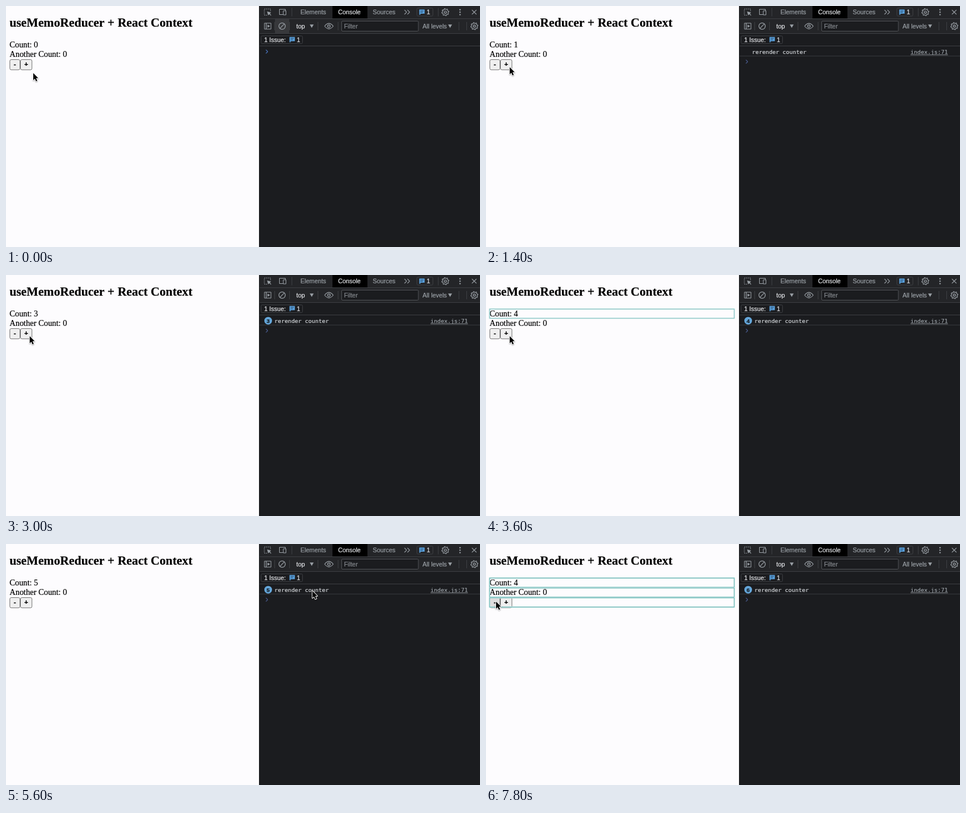
An HTML page with a canvas that plays this animation: 800 px wide and 407 px high, repeating every 8000 ms.

```html
<!DOCTYPE html>
<html lang="en">
<head>
<meta charset="utf-8">
<title>Reducer demo with console</title>
<style>
  html, body { margin: 0; width: 100%; height: 100%; overflow: hidden; background: #fdfcfe; }
  canvas { display: block; width: 100vw; height: 100vh; }
</style>
</head>
<body>
<canvas id="stage"></canvas>
<script>
const W = 800, H = 407, LOOP = 8000, STEP = 200;
const canvas = document.getElementById('stage');
const ctx = canvas.getContext('2d');
const ratio = window.devicePixelRatio || 1;
canvas.width = W * ratio;
canvas.height = H * ratio;

const SANS = '"Liberation Sans", sans-serif';
const SERIF = '"Liberation Serif", serif';
const UI = '10.4px ' + SANS;
const BODY = '13.84px ' + SERIF;
const MONO = '9.52px "DejaVu Sans Mono", monospace';
const PAGE = '#fdfcfe', PANEL = '#1b1c1f', BAR = '#242528', LINE = '#3c3e42';
const ICON = '#9aa0a6', BRIGHT = '#e8eaed', BLUE = '#5ba3e0';

// The plus button is clicked at an even pace, then minus once
const plusClicks = Array.from({ length: 5 }, (_, i) => 1000 + 750 * i);
const MINUS_CLICK = 7800;

const home = { x: 46, y: 112 };
const moves = [
  { from: 200, to: 1000, x: 40, y: 102 },
  { from: 3800, to: 4200, x: 50, y: 107 },
  { from: 4400, to: 4800, x: 41, y: 103 },
  { from: 4800, to: 5800, x: 537, y: 77 },
  { from: 6000, to: 6400, x: 752, y: 77 },
  { from: 6800, to: 7600, x: 17, y: 96 }
];

const easeOut = k => 1 - (1 - k) ** 2;

function pointerAt(t) {
  let { x, y } = home;
  for (const m of moves) {
    if (t <= m.from) break;
    const k = easeOut(Math.min(1, (t - m.from) / (m.to - m.from)));
    x += (m.x - x) * k;
    y += (m.y - y) * k;
  }
  return { x, y };
}

// A hairline stroke gives the heavier look of smoothed text
function text(str, x, y, font, color, align = 'left') {
  ctx.font = font;
  ctx.fillStyle = ctx.strokeStyle = color;
  ctx.lineWidth = 0.2;
  ctx.textAlign = align;
  ctx.fillText(str, x, y);
  ctx.strokeText(str, x, y);
}

function rect(x, y, w, h, color) {
  ctx.fillStyle = color;
  ctx.fillRect(x, y, w, h);
}

function paint(fill, stroke, width = 1.1) {
  if (fill) { ctx.fillStyle = fill; ctx.fill(); }
  if (stroke) { ctx.strokeStyle = stroke; ctx.lineWidth = width; ctx.stroke(); }
}

function box(x, y, w, h, r, fill, stroke, width = 1) {
  ctx.beginPath();
  ctx.roundRect(x, y, w, h, r);
  paint(fill, stroke, width);
}

function circle(x, y, r, fill, stroke) {
  ctx.beginPath();
  ctx.arc(x, y, r, 0, Math.PI * 2);
  paint(fill, stroke, 1.2);
}

function line(x1, y1, x2, y2, color = ICON, width = 1.2) {
  ctx.beginPath();
  ctx.moveTo(x1, y1);
  ctx.lineTo(x2, y2);
  paint(null, color, width);
}

function triangle(x, y, r, angle) {
  ctx.beginPath();
  for (let i = 0; i < 3; i++) {
    const a = angle + i * Math.PI * 2 / 3;
    ctx.lineTo(x + r * Math.cos(a), y + r * Math.sin(a));
  }
  ctx.closePath();
  paint(ICON);
}

function chevron(x, y, r, color = ICON) {
  line(x, y - r, x + r, y, color);
  line(x + r, y, x, y + r, color);
}

function gear(x, y) {
  ctx.beginPath();
  for (let i = 0; i < 32; i++) {
    const a = (i - 1.5) * Math.PI / 16;
    const r = i % 4 < 2 ? 6 : 4.6;
    ctx.lineTo(x + r * Math.cos(a), y + r * Math.sin(a));
  }
  ctx.closePath();
  paint(null, ICON);
  circle(x, y, 1.9, null, ICON);
}

function chat(x, y) {
  rect(x - 4.5, y - 4.5, 9, 7, BLUE);
  rect(x - 4.5, y + 2.5, 2, 1.8, BLUE);
  rect(x - 2.8, y - 2.7, 5.6, 0.9, '#23405c');
  rect(x - 2.8, y - 0.4, 4.3, 0.9, '#23405c');
}

const divider = (x, y) => rect(x, y - 7, 1, 14, LINE);
const down = (x, y) => triangle(x, y, 3.8, Math.PI / 2);

function drawTabs() {
  const y = 10.4;
  rect(551, 0, 59, 21, '#000');
  ctx.setLineDash([1.6, 1.4]);
  box(436, 5, 10.5, 10.5, 0, null, ICON);
  ctx.setLineDash([]);
  rect(441, 9.5, 7, 7, BAR);
  triangle(443.5, 12, 4, Math.PI * 1.25);
  line(443.5, 12, 447.3, 15.8);

  box(461.5, 5.5, 10, 9, 0, null, ICON);
  box(468, 8, 4.5, 7, 0, BAR, ICON);

  text('Elements', 497, 14, UI, ICON);
  text('Console', 560.5, 14, UI, BRIGHT);
  text('Sources', 619, 14, UI, ICON);
  for (const x of [672.5, 677.5]) chevron(x, y, 3.8);
  box(693.5, 3.5, 27, 13.5, 2, null, LINE);
  chat(702, y);
  text('1', 710, 14, UI, BRIGHT);
  for (const x of [482, 729]) divider(x, y);
  gear(741.5, y);
  for (const dy of [-4.2, 0, 4.2]) circle(766.3, y + dy, 1.2, ICON);
  for (const s of [-3.8, 3.8]) line(790.2 - s, y - 3.8, 790.2 + s, y + 3.8);
}

function drawFilterBar(cleared) {
  const y = 34;
  if (cleared) rect(454, 22, 24, 24, '#37383b');
  box(436.2, 29, 11, 10, 0, null, ICON);
  line(439.2, 29, 439.2, 39);
  triangle(442.8, y, 2.8, 0);
  circle(466, y, 5.4, null, ICON);
  line(462.2, y + 3.8, 469.8, y - 3.8);
  text('top', 490, 37.5, UI, BRIGHT);
  down(516, 33.2);

  ctx.beginPath();
  ctx.moveTo(537.7, y);
  ctx.quadraticCurveTo(545, y - 9.2, 552.3, y);
  ctx.quadraticCurveTo(545, y + 9.2, 537.7, y);
  paint(null, ICON);
  circle(545, y, 2.2, null, ICON);

  box(566.5, 25.5, 129.5, 17, 1.5, PANEL, '#505256');
  text('Filter', 570.5, 37.7, UI, '#85898e');
  text('All levels', 703, 37.7, UI, ICON);
  down(749.5, 33.2);
  for (const x of [453, 478, 526, 560, 764, 777]) divider(x, y);
  gear(790.5, y);
}

function drawConsole(logs, cleared) {
  rect(427, 0, W - 427, H, PANEL);
  rect(428, 0, W - 428, 46, BAR);
  for (const y of [21, 46, 67]) rect(428, y, W - 428, 1, LINE);
  drawTabs();
  drawFilterBar(cleared);
  box(430.5, 50.5, 70, 13, 2, null, LINE);
  text('1 Issue:', 435.7, 60.6, UI, BRIGHT);
  chat(483, 56.9);
  text('1', 490.7, 60.6, UI, BRIGHT);

  if (logs > 1) {
    circle(442.5, 77.2, 6.5, '#64a5d8');
    text(logs, 442.5, 80.8, 'bold 9.6px ' + SANS, '#10181f', 'center');
  }
  if (logs) {
    text('rerender counter', logs > 1 ? 453 : 449, 80.8, MONO, '#d0d3d7');
    text('index.js:71', 716.5, 80.8, MONO, ICON);
    rect(716.5, 82, 63, 1, '#85898e');
    rect(428, 84, W - 428, 1, '#36383c');
  }
  chevron(438.6, logs ? 94 : 77, 3.2, logs ? '#48598a' : '#4870b8');
}

function drawPage(count, buttonFill) {
  rect(0, 0, 427, H, PAGE);
  text('useMemoReducer + React Context', 6, 34.6, 'bold 20.76px ' + SERIF, '#000');
  text('Count: ' + count, 6, 70, BODY, '#000');
  text('Another Count: 0', 6, 86.3, BODY, '#000');
  for (const [name, x, w] of [['-', 6.5, 17], ['+', 24.5, 19.3]]) {
    box(x, 90.5, w, 17.3, 2.4, buttonFill(name), '#767676');
    text(name, x + w / 2, 102.3, 'bold 11.5px ' + SANS, '#000', 'center');
  }
}

function drawOutlines(rows, alpha) {
  ctx.globalAlpha = alpha;
  for (let i = 0; i < rows; i++) {
    const y = 57.5 + 16.7 * i;
    box(6, y, 413, 15.6, 0, null, '#cbe7e7', 2.4);
    box(6, y, 413, 15.6, 0, null, '#69b5b2');
  }
  ctx.globalAlpha = 1;
}

function drawPointer({ x, y }) {
  const arrow = [[0, 0], [0, 12], [2.7, 9.5], [4.8, 14], [6.8, 13.1], [4.8, 8.6], [8.4, 8.6]];
  ctx.save();
  ctx.translate(x, y + 1.2);
  ctx.beginPath();
  for (const p of arrow) ctx.lineTo(...p);
  ctx.closePath();
  ctx.lineJoin = 'round';
  ctx.shadowColor = 'rgba(0,0,0,.35)';
  ctx.shadowBlur = 2 * ratio;
  ctx.shadowOffsetY = ratio;
  paint(null, '#fff', 1.8);
  ctx.shadowColor = 'transparent';
  paint('#000');
  ctx.restore();
}

function render(t) {
  ctx.setTransform(ratio, 0, 0, ratio, 0, 0);
  const plus = plusClicks.filter(at => at <= t);
  const minus = t >= MINUS_CLICK ? 1 : 0;
  const age = t - (minus ? MINUS_CLICK : plus.length ? plus[plus.length - 1] : -LOOP);
  const pointer = pointerAt(t);
  const over = pointer.y > 106 || pointer.x > 44 ? '' : pointer.x < 24 ? '-' : '+';
  const buttonFill = name => name === over && age < STEP ? '#dedcdd' : '#efefef';

  drawPage(plus.length - minus, buttonFill);
  if (age < 2 * STEP) drawOutlines(minus ? 3 : 1, age < STEP ? 1 : 0.75);
  drawConsole(plus.length + minus, t < STEP);
  drawPointer(pointer);
}

const start = performance.now();
function tick() {
  const t = (performance.now() - start) % LOOP;
  render(Math.floor(t / STEP) * STEP);
  requestAnimationFrame(tick);
}
tick();
</script>
</body>
</html>
```
